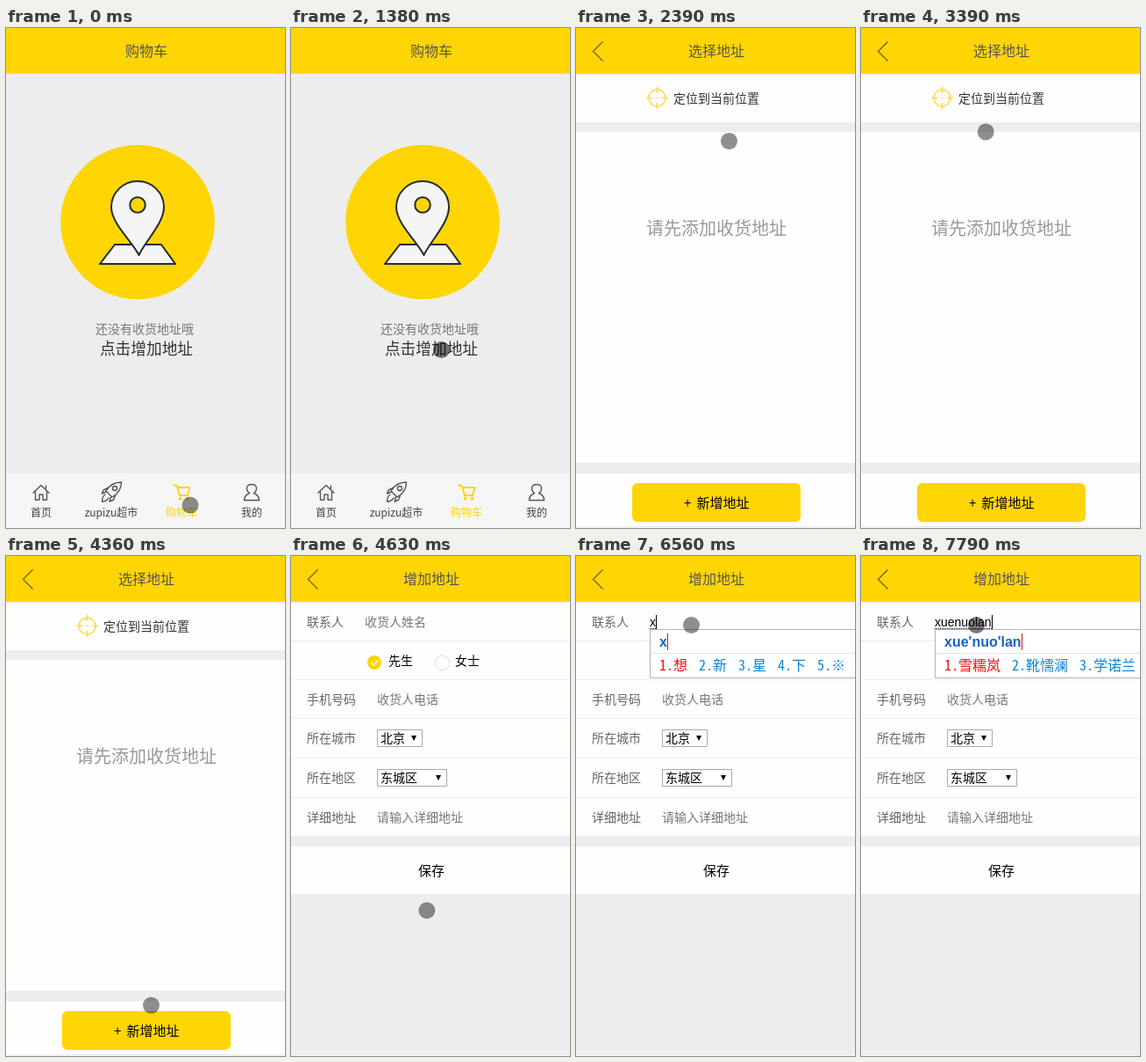
Animation, 318 px wide and 568 px high, one loop 8 s. Source, as an HTML page:

```html
<!DOCTYPE html>
<html lang="zh-CN">
<head>
<meta charset="utf-8">
<style>
html, body { margin: 0; width: 100%; height: 100%; overflow: hidden; background: #ededed; }
svg { display: block; width: 318px; height: 568px; font: 14px "Noto Sans CJK SC", "Noto Sans SC", sans-serif; }
text { white-space: pre; }
.mid { text-anchor: middle; }
.title { font-size: 16px; fill: #555; text-anchor: middle; }
.tab { font-size: 12px; fill: #444; text-anchor: middle; }
.icon { fill: none; stroke: #555; stroke-width: 1.4; stroke-linejoin: round; stroke-linecap: round; }
.label { fill: #666; }
.hint { fill: #777; }
.latin { font-family: "Liberation Sans", Arial, sans-serif; }
#candidates { font: 16px "Noto Sans Mono CJK SC", "Noto Sans CJK SC", monospace; fill: #0a84d8; }
#candidates :first-child { fill: #f01010; }
</style>
</head>
<body>
<svg viewBox="0 0 318 568">
  <rect width="318" height="568" fill="#ededed"/>
  <rect width="318" height="52" fill="#ffd504"/>

  <g id="cart">
    <text class="title" x="160" y="32">购物车</text>
    <circle cx="150" cy="220.5" r="87.8" fill="#ffd504"/>
    <g fill="#f5f5f5" stroke="#222b33" stroke-width="2" stroke-linejoin="round">
      <path d="M124 246H177L193 268H107Z"/>
      <path d="M151.500 258C144 243 120 222 120 203.500A30 29.500 0 0 1 180 203.500C180 222 158 243 151.500 258Z"/>
      <circle cx="150" cy="201" r="8.800" fill="#ffd504"/>
    </g>
    <text class="hint" x="102" y="347">还没有收货地址哦</text>
    <text class="mid" x="160" y="371" font-size="17.700" fill="#333">点击增加地址</text>
    <rect y="506" width="318" height="61" fill="#f6f6f6"/>
    <g class="icon">
      <path d="M31 528L40 519.500L49 528M33.500 527V536H38V530H42V536H46.500V527M45.500 520V523"/>
      <path d="M114 526C118 519 124 516 131.500 516C131.500 523 128 529 121 533ZM117 522L111 525L109.500 529L114 527M125 530L122.500 536L118 538L119.500 533M113 530C110 532 109.500 535 109.500 538C113 538 115.500 536 117 534"/>
      <circle cx="124" cy="523" r="2.500"/>
      <path d="M271.500 536.500C271.500 531 275 529.500 277.500 528.500C272.500 524 274 518.500 280 518.500S287.500 524 282.500 528.500C285 529.500 288.500 531 288.500 536.500Z"/>
      <g stroke="#ffd504" stroke-width="1.900">
        <path d="M191 519.500H194.500L198 531H207L209.500 522H196"/>
        <circle cx="198.500" cy="534.500" r="1"/><circle cx="206.500" cy="534.500" r="1"/>
      </g>
    </g>
    <text class="tab" x="40" y="555">首页</text>
    <text class="tab" x="120" y="555">zupizu超市</text>
    <text class="tab" x="200" y="555" style="fill:#ffd504">购物车</text>
    <text class="tab" x="280" y="555">我的</text>
  </g>

  <path id="back" d="M30.500 15.500L19.500 26.500L30.500 37.500" fill="none" stroke="#6b5d18" stroke-width="1.200"/>

  <g id="select">
    <text class="title" x="160" y="32">选择地址</text>
    <path d="M0 53H318V107H0ZM0 118H318V494H0ZM0 506H318V566H0Z" fill="#fefefe"/>
    <g fill="none" stroke="#ffd84a" stroke-width="1.600">
      <circle cx="92.500" cy="79.500" r="9.500"/>
      <path d="M92.500 67V74M92.500 85V92M80 79.500H87M98 79.500H105M91.500 79.500H93.500"/>
    </g>
    <text x="111" y="85" fill="#333">定位到当前位置</text>
    <text x="80" y="234.500" font-size="20" fill="#999">请先添加收货地址</text>
    <rect x="64" y="517" width="192" height="44" rx="6" fill="#ffd504"/>
    <text x="123" y="545" font-size="15">+</text>
    <text x="137.500" y="545" font-size="15">新增地址</text>
  </g>

  <g id="form">
    <text class="title" x="160" y="32">增加地址</text>
    <path d="M0 53H318V318H0ZM0 330H318V384H0Z" fill="#fefefe"/>
    <path d="M0 96.500H318M0 140.500H318M0 184.500H318M0 229.500H318M0 274.500H318" stroke="#ececec"/>
    <g class="label">
      <text x="18" y="80">联系人</text>
      <text x="18" y="168">手机号码</text>
      <text x="18" y="212">所在城市</text>
      <text x="18" y="257">所在地区</text>
      <text x="18" y="302">详细地址</text>
    </g>
    <g class="hint">
      <text id="nameHint" x="84" y="80">收货人姓名</text>
      <text x="98" y="168">收货人电话</text>
      <text x="98" y="302">请输入详细地址</text>
    </g>
    <circle cx="95" cy="121" r="8" fill="#ffd504"/>
    <path d="M91.500 121L94.300 123.800L99 118.500" fill="none" stroke="#fff" stroke-width="1.600"/>
    <circle cx="172.500" cy="121.500" r="8.300" fill="#fff" stroke="#ddd"/>
    <text x="111" y="124">先生</text>
    <text x="187" y="124">女士</text>
    <path d="M98.500 197.500H149.500V216.500H98.500ZM98.500 242.500H177.500V261.500H98.500Z" fill="#fff" stroke="#a9a9a9"/>
    <path d="M137 204H143L140 210ZM165 249H171L168 255Z"/>
    <text x="102" y="212">北京</text>
    <text x="102" y="257">东城区</text>
    <text class="mid" x="160" y="363" font-size="15">保存</text>

    <text id="typed" class="latin" x="84" y="80"></text>
    <path id="underline" stroke="#000" stroke-dasharray="1 1"/>
    <rect id="caret" y="67" width="1" height="16"/>
    <g id="ime">
      <path d="M330 83.500H84.500V138.500H330" fill="#fff" stroke="#aab4c2"/>
      <path d="M85 110.500H318" stroke="#dde2e8"/>
      <text id="pinyin" class="latin" x="95" y="103" font-size="16" font-weight="bold" fill="#1a62c4"></text>
      <rect id="imeCaret" y="88" width="1" height="19" fill="#f01010"/>
      <g id="candidates"></g>
    </g>
  </g>

  <path d="M0 567.500H318" stroke="#f6f6f6"/>
  <circle id="cursor" r="9.500"/>
</svg>
<script>
const $ = id => document.getElementById(id);
const show = (id, on) => $(id).style.display = on ? '' : 'none';
const STEP = 130, KEY_GAP = 140;

// Pointer strokes: each glides from the previous stop to its own
const strokes = [
  { from: 560, to: 1070, x: 166, y: 373 },
  { from: 1380, to: 1380, x: 171.5, y: 365.5 },
  { from: 2090, to: 2390, x: 174.5, y: 128.5 },
  { from: 2540, to: 2670, x: 211, y: 88 },
  { from: 2800, to: 3090, x: 140, y: 84 },
  { from: 3390, to: 4080, x: 170, y: 543 },
  { from: 4360, to: 4360, x: 165.5, y: 510.5 },
  { from: 4490, to: 5140, x: 124.5, y: 94.5 },
  { from: 5270, to: 5270, x: 131.5, y: 78.5 }
];

// Typing comes in bursts of letters at an even pace
const bursts = [
  { at: 6560, first: 1, last: 1 },
  { at: 6840, first: 2, last: 5 },
  { at: 7640, first: 8, last: 9 }
];
const syllables = ['xue', 'nuo', 'lan'];
const guesses = ['想', '新', '星', '下', '※'];
const names = ['雪糯岚', '靴懦澜', '学诺兰'];

const ease = p => p * p * (3 - 2 * p);

function pointerAt(t) {
  let x = 210, y = 542;
  for (const s of strokes.filter(s => s.from <= t)) {
    const steps = Math.round((s.to - s.from) / STEP) + 1;
    const done = Math.floor((t - s.from) / STEP) + 1;
    const p = ease(Math.min(1, done / steps));
    x += (s.x - x) * p;
    y += (s.y - y) * p;
  }
  return [x, y];
}

function lettersAt(t) {
  const burst = bursts.filter(b => b.at <= t).pop();
  return burst ? Math.min(burst.last, burst.first + Math.floor((t - burst.at) / KEY_GAP)) : 0;
}

let drawnCount;
function drawInput(count) {
  if (count === drawnCount) return;
  drawnCount = count;
  const parts = syllables.map((s, i) => s.slice(0, Math.max(0, count - 3 * i))).filter(Boolean);
  $('typed').textContent = parts.join('');
  $('pinyin').textContent = parts.join("'");
  const end = 84 + (count && $('typed').getComputedTextLength());
  $('caret').setAttribute('x', Math.round(end));
  $('underline').setAttribute('d', `M84 82.5H${end}`);
  $('imeCaret').setAttribute('x', Math.round(95 + (count && $('pinyin').getComputedTextLength())));

  const words = parts.length > 1 ? names.map(n => n.slice(0, parts.length)) : guesses;
  const pitch = 29 + 16 * words[0].length;
  $('candidates').innerHTML = words.map((word, i) =>
    `<text x="${95 + i * pitch}" y="130">${i + 1}.${word}</text>`).join('');
}

function draw(now) {
  const t = now % 8000;
  const inForm = t >= 4490;
  show('cart', t < 1810);
  show('back', t >= 1810);
  show('select', t >= 1810 && !inForm);
  show('form', inForm);

  const count = lettersAt(t);
  for (const id of ['ime', 'underline']) show(id, count);
  show('nameHint', !count);
  show('caret', count || t >= 5560 && t < 6060);
  drawInput(count);

  const pressed = t >= 1380 && t < 1810 || t >= 7640;
  $('cursor').setAttribute('transform', `translate(${pointerAt(t)})`);
  $('cursor').setAttribute('fill-opacity', pressed ? 0.52 : 0.44);
  requestAnimationFrame(draw);
}
requestAnimationFrame(draw);
</script>
</body>
</html>
```
